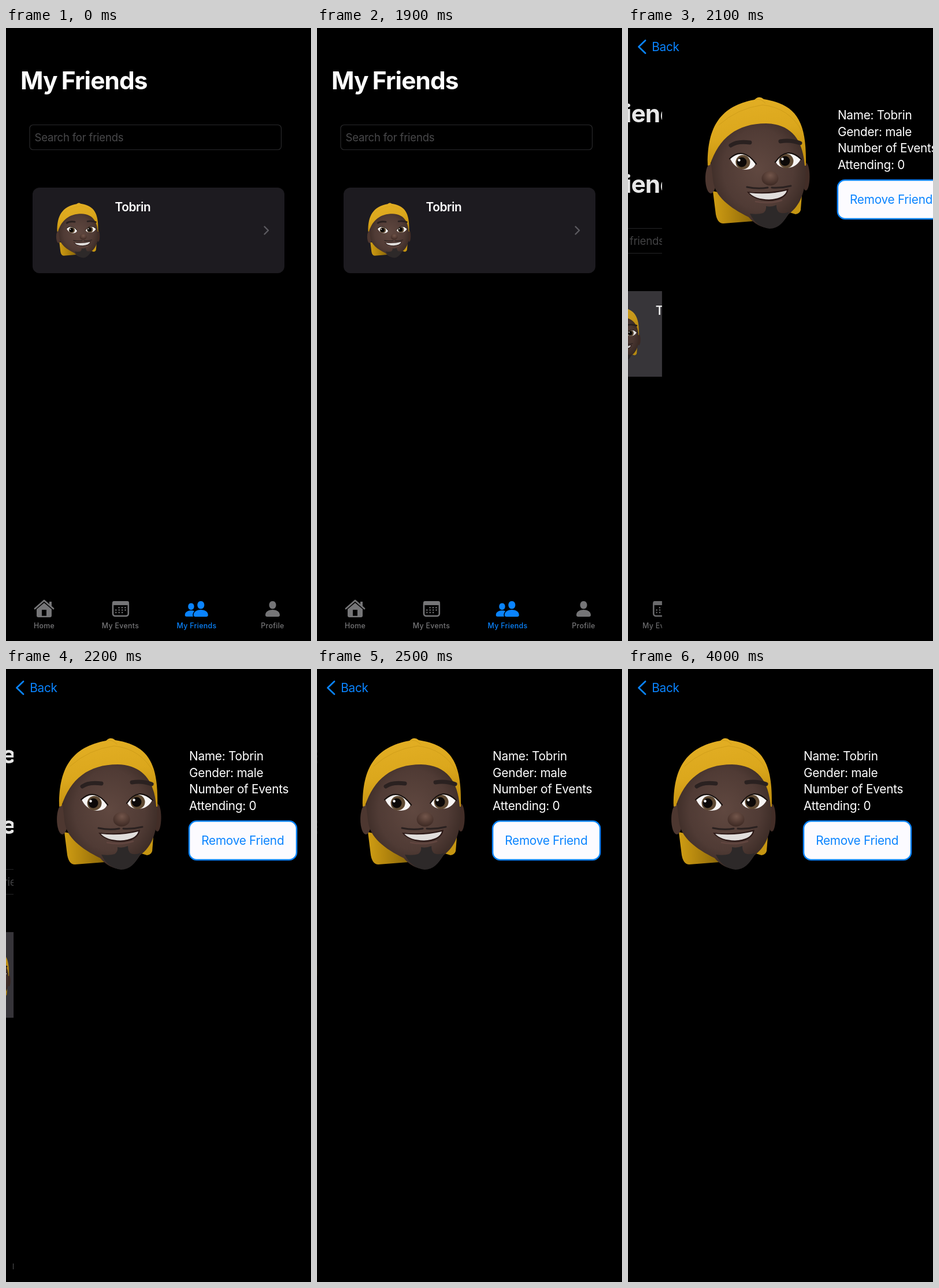
Recreate the animation shown at these times as an HTML page. Size 528 by 1060 pixels, loop 4.1 s.

```html
<!DOCTYPE html>
<html lang="en">
<head>
<meta charset="utf-8">
<title>My Friends</title>
<style>
  html, body { margin: 0; height: 100%; background: #000; overflow: hidden; }
  svg { display: block; width: 100vw; height: 100vh; }
  text { font: 400 20.8px Inter, "Open Sans", sans-serif; letter-spacing: -.013em; fill: #fff; }
  .title { font-size: 42.4px; font-weight: 700; letter-spacing: -.021em; word-spacing: -2px; }
  .hint { font-size: 18.6px; fill: #48484a; }
  .name { font-weight: 600; letter-spacing: -.02em; }
  .tab { fill: #757577; stroke: none; }
  .tab text { font-size: 12.4px; font-weight: 500; letter-spacing: .3px; text-anchor: middle; fill: inherit; }
  .blue, .blue text, text.blue { fill: #0a84ff; }
  .line { fill: none; stroke-linecap: round; stroke-linejoin: round; }
</style>
</head>
<body>
<svg viewBox="0 0 528 1060">
  <defs>
    <radialGradient id="skin" cx=".5" cy=".45" r=".62">
      <stop offset="0" stop-color="#604840"/>
      <stop offset=".6" stop-color="#503b35"/>
      <stop offset="1" stop-color="#32241f"/>
    </radialGradient>
    <radialGradient id="nose" cx=".52" cy=".3" r=".65">
      <stop offset="0" stop-color="#73564b"/>
      <stop offset=".6" stop-color="#543c34"/>
      <stop offset="1" stop-color="#402c26"/>
    </radialGradient>
    <linearGradient id="cloth" x2=".25" y2="1">
      <stop offset="0" stop-color="#e4b026"/>
      <stop offset=".6" stop-color="#dba71c"/>
      <stop offset="1" stop-color="#c4910f"/>
    </linearGradient>
    <linearGradient id="flap">
      <stop offset="0" stop-color="#cf9d14"/>
      <stop offset=".35" stop-color="#b5870e"/>
      <stop offset="1" stop-color="#7d5d08"/>
    </linearGradient>

    <g id="eye">
      <circle r="12.500" fill="#5f4a33"/>
      <circle cx="-2" r="8.500" fill="#0c0908"/>
      <circle cx="-6.500" cy="-3.500" r="2.2" fill="#fff"/>
    </g>

    <g id="avatar">
      <path d="M88 282L93 322Q96 338 106 338L158 334L172 300Z" fill="url(#flap)"/>
      <path d="M242 290L240 315Q238 321 231 322L218 318Z" fill="#c69612"/>
      <ellipse cx="84.500" cy="260" rx="9.500" ry="26" fill="#4d3730"/>
      <ellipse cx="249" cy="257" rx="6.500" ry="24" fill="#422d27"/>
      <path d="M85 236C88 190 110 160 172 160C230 160 247 195 248 238C251 285 237 309 219 322Q204 346 186 346Q165 345 150 327C118 311 91 292 88 262Z" fill="url(#skin)"/>
      <path d="M79 238C78 172 100 135 160 124Q168 116 176 123C232 132 251 160 249 238H247C244 195 225 166 180 165C130 165 98 190 83 237Z" fill="url(#cloth)"/>
      <path class="line" d="M162 124Q170 121 179 130M98 168Q130 139 174 133Q220 138 242 178" stroke="#b98a10" stroke-width="1" opacity=".4"/>
      <g class="line" stroke="#2a2120">
        <path d="M119 203Q130 195 152 198M205 196Q222 193 239 199" stroke-width="7"/>
        <path d="M147 275Q166 279 183 276M190 276Q207 277 223 273" stroke-width="3"/>
      </g>
      <g fill="#f7f5f4">
        <path d="M118 226Q140 205 162 234Q159 245 143 245Q126 243 118 226Z"/>
        <path d="M197 232Q216 204 240 227Q232 242 215 242Q201 241 197 232Z"/>
      </g>
      <use href="#eye" x="140" y="232"/>
      <use href="#eye" x="215" y="230"/>
      <path class="line" d="M117 226Q140 204 163 235M196 232Q216 203 241 227" stroke="#17100e" stroke-width="2.2"/>
      <ellipse cx="187" cy="260" rx="14.5" ry="12.5" fill="url(#nose)"/>
      <path d="M147 283Q184 287 219 278Q216 298 185 299Q158 298 147 283Z" fill="#2b1816"/>
      <path d="M151 285Q184 289 216 281Q212 295 185 296.500Q161 296 151 285Z" fill="#e0dddb"/>
      <path class="line" d="M162 300Q185 305 207 298" stroke="#624640" stroke-width="2.5"/>
      <path d="M180 308Q189 310 198 306Q198 316 203 319Q211 322 220 318Q207 347 186 347Q163 344 152 321Q166 323 175 320Q181 316 180 308Z" fill="#2d2929"/>
    </g>

    <path id="bust" d="M-12.500 17.500C-12.500 5.500 12.500 5.500 12.500 17.500Q12.500 20.500 9.500 20.500H-9.500Q-12.500 20.500 -12.500 17.500ZM0 -6.500C8 -6.500 8 7 0 7C-8 7 -8 -6.500 0 -6.500Z"/>
  </defs>

  <rect width="528" height="1060"/>

  <g id="list">
    <text id="heading" class="title" x="25" y="162.800">My Friends</text>
    <g id="content">
      <text class="title" x="25" y="106">My Friends</text>
      <rect x="41" y="167.500" width="435.500" height="43" rx="6" fill="none" stroke="#29292b" stroke-width="1.2"/>
      <text class="hint" x="49.500" y="196">Search for friends</text>
      <rect id="card" x="46" y="276" width="436" height="148" rx="12"/>
      <use href="#avatar" transform="translate(55.500 252.400) scale(.418)"/>
      <text class="name" x="188.500" y="317">Tobrin</text>
      <path class="line" d="M447.500 343.500L454 350L447.500 356.500" stroke="#5c5b60" stroke-width="2.4"/>
    </g>

    <g class="tab">
      <path class="line" d="M50 1004L66 990L82 1004" stroke="#757577" stroke-width="2.8"/>
      <path d="M75 992H79V1002L75 998ZM53 1005L66 994L79 1005V1016Q79 1019 76 1019H56Q53 1019 53 1016Z"/>
      <rect x="62" y="1006" width="8" height="10.500" fill="#000"/>
      <text x="66" y="1038">Home</text>
    </g>
    <g class="tab">
      <rect x="185" y="992.300" width="26.800" height="24.500" rx="4" fill="none" stroke="#757577" stroke-width="2.6"/>
      <rect x="184" y="991" width="29" height="7" rx="3"/>
      <path class="line" d="M195.500 1002.200H208M190.300 1006.500H208M190.300 1010.800H203" stroke="#757577" stroke-width="2.4" stroke-dasharray=".1 5.300"/>
      <text x="198" y="1038">My Events</text>
    </g>
    <g class="tab blue">
      <use href="#bust" transform="translate(320.500 1000) scale(.86)"/>
      <use href="#bust" x="337.300" y="997.500" stroke="#000" stroke-width="3" paint-order="stroke"/>
      <text x="330" y="1038">My Friends</text>
    </g>
    <g class="tab">
      <use href="#bust" x="461.500" y="997.500"/>
      <text x="461.500" y="1038">Profile</text>
    </g>
    <rect id="dim" width="528" height="1060"/>
  </g>

  <g id="detail">
    <rect width="528" height="1060"/>
    <use href="#avatar"/>
    <text x="304" y="158">Name: Tobrin</text>
    <text x="304" y="186.700">Gender: male</text>
    <text x="304" y="215.300">Number of Events</text>
    <text x="304" y="243.800">Attending: 0</text>
    <rect x="304" y="263" width="186" height="67" rx="13" fill="#fcfbff" stroke="#0a84ff" stroke-width="2.500"/>
    <text class="blue" x="396.700" y="304.300" text-anchor="middle">Remove Friend</text>
  </g>

  <g id="back">
    <path class="line" d="M30 21.500L18.500 32.500L30 43.500" stroke="#0a84ff" stroke-width="2.800"/>
    <text class="blue" x="41.200" y="40">Back</text>
  </g>
</svg>
<script>
  const LOOP = 4100, STEP = 100, WIDTH = 528;
  const PUSH_START = 1895, SHOWN_FROM = 2000, STIFFNESS = 18.3;
  const el = id => document.getElementById(id);
  const move = (id, x, y = 0) => el(id).setAttribute('transform', `translate(${x} ${y})`);
  const show = (id, on) => el(id).setAttribute('visibility', on ? 'visible' : 'hidden');

  function draw() {
    const t = Math.floor(performance.now() % LOOP / STEP) * STEP;
    const pushed = t >= SHOWN_FROM;
    // Critically damped spring; the page below slides at 30% of the distance.
    const s = (t - PUSH_START) / 1000 * STIFFNESS;
    const left = pushed ? (1 + s) * Math.exp(-s) : 1;

    move('list', -.3 * WIDTH * (1 - left));
    move('content', 0, pushed ? 179 : 0);
    move('detail', WIDTH * left);
    el('dim').setAttribute('opacity', .1 * (1 - left));
    el('card').setAttribute('fill', pushed ? '#3c3a3f' : '#1d1b20');
    for (const id of ['heading', 'detail', 'back']) show(id, pushed);
    requestAnimationFrame(draw);
  }
  draw();
</script>
</body>
</html>
```
